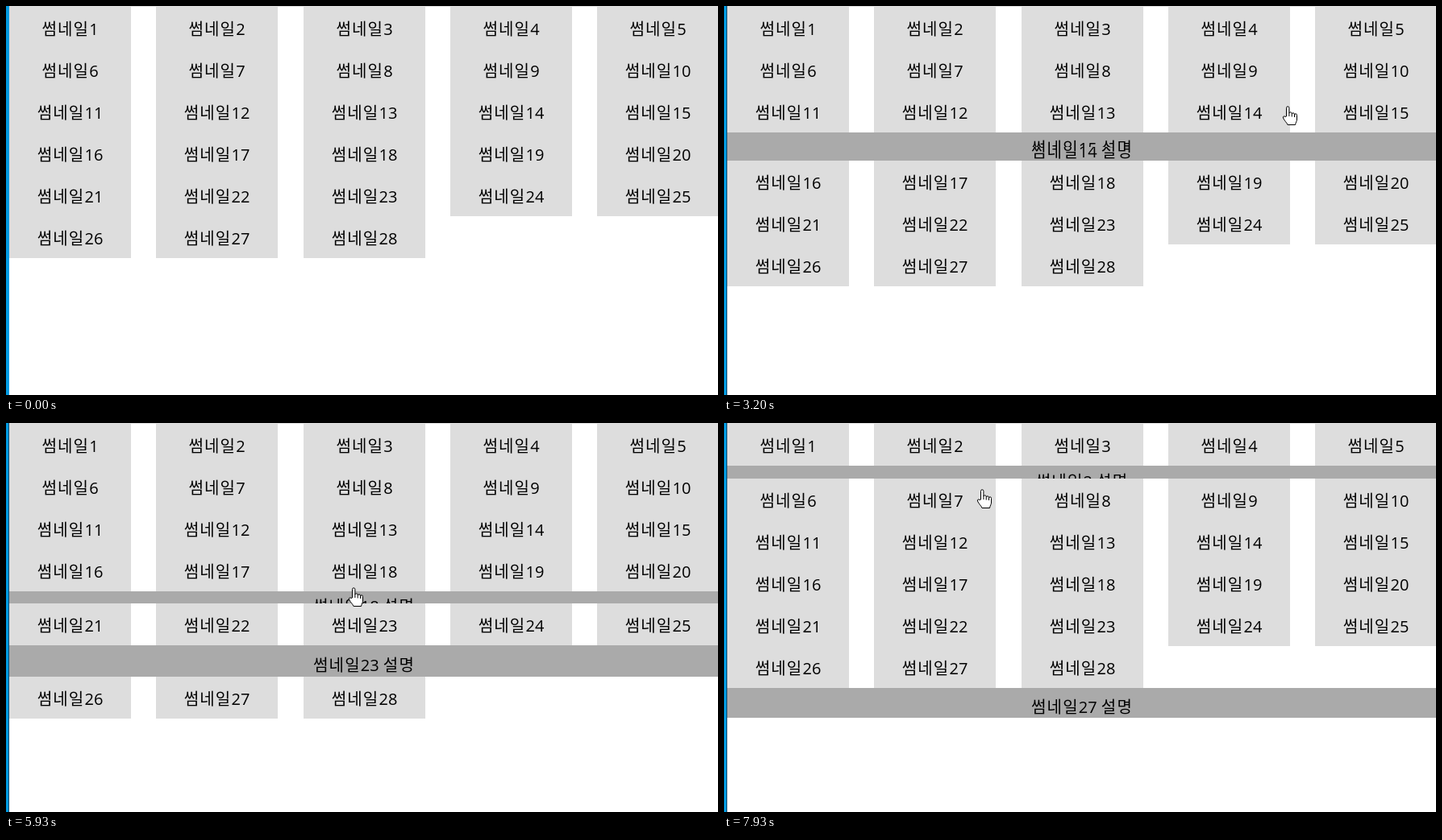
Recreate the animation shown at these times as an HTML page with a canvas. Size 883 px wide and 483 px high, loop 8 s.

```html
<!DOCTYPE html>
<html lang="ko">
<head>
<meta charset="utf-8">
<title>썸네일 아코디언</title>
<style>
html, body { margin: 0; width: 100%; height: 100%; overflow: hidden; background: #fff; }
canvas { display: block; }
</style>
</head>
<body>
<canvas id="stage" width="883" height="483"></canvas>
<script>
const ctx = document.getElementById('stage').getContext('2d');
const LOOP = 8000, SLIDE = 800, REST = 150;
const COUNT = 28, COLS = 5, ROW_H = 52, PANEL_H = 52.4;
const HANGUL = { font: '300 20px "Noto Sans CJK KR", "Noto Sans CJK", sans-serif', spacing: '1.2px' };
const LATIN = { font: '20px "Open Sans", "Noto Sans", sans-serif', spacing: '0px' };

// Pointer stops; those with an id click that thumbnail
const stops = [
  { t: 500, x: 440, y: 500 },
  { t: 1130, x: 444, y: 140, id: 13 },
  { t: 2150, x: 610, y: 129, id: 14 },
  { t: 2883, x: 802, y: 122, id: 15 },
  { t: 3762, x: 271, y: 134, id: 12 },
  { t: 4280, x: 274, y: 203 },
  { t: 4805, x: 460, y: 282, id: 23 },
  { t: 5070, x: 460, y: 282 },
  { t: 5650, x: 446, y: 192, id: 18 },
  { t: 6655, x: 260, y: 342, id: 27 },
  { t: 7635, x: 263, y: 37, id: 2 },
  { t: 8200, x: 361, y: 114 }
];
const clicks = stops.filter(stop => stop.id);

const arrow = new Path2D('M-.5.5V16.5L3 13L5.5 18.5L8 17.5L5.7 12H10.5Z');
const hand = new Path2D('M-1.5 13V2.5a1.7 1.7 0 0 1 3.4 0V9a1.7 1.7 0 0 1 3.3.2V10a1.7 1.7 0 0 1 3.3.4v.8' +
  'a1.5 1.5 0 0 1 3 .3V17c0 2-1.5 3.5-2 6.5H0c-.8-2.5-4-5-5.5-8.5-.8-2 1.4-2.8 2.5-1.5z' +
  'M1.9 9v4M5.2 10v3.5M8.5 11v3');

const swing = x => (1 - Math.cos(Math.PI * Math.min(1, Math.max(0, x)))) / 2;
const colX = c => Math.round(4 + 182.25 * c);

function rect(color, x, y, w, h) {
  ctx.fillStyle = color;
  ctx.fillRect(x, y, w, h);
}

function useFace({ font, spacing }) {
  ctx.font = font;
  ctx.letterSpacing = spacing;
}

// Centred text; digits and spaces use the Latin face
function label(text, cx, baseline) {
  const runs = text.split(/([\d ]+)/).filter(Boolean).map(s => {
    const face = /[\d ]/.test(s) ? LATIN : HANGUL;
    useFace(face);
    return { s, face, w: ctx.measureText(s).width };
  });
  let x = cx - runs.reduce((sum, run) => sum + run.w, 0) / 2;
  ctx.fillStyle = '#000';
  for (const { s, face, w } of runs) {
    useFace(face);
    ctx.fillText(s, x, baseline);
    x += w;
  }
}

// Each click opens its panel and closes the one before
function openPanels(t) {
  return clicks.map(({ t: start, id }, i) => {
    const end = clicks[i + 1]?.t ?? Infinity;
    const p = swing((t - start) / SLIDE) * (1 - swing((t - end) / SLIDE));
    return { id, p, row: Math.floor((id - 1) / COLS), h: p === 1 ? ROW_H : Math.ceil(PANEL_H * p) };
  }).filter(panel => panel.h > 0).sort((a, b) => a.id - b.id);
}

function drawPanel({ id, p, h }, y) {
  ctx.save();
  ctx.beginPath();
  ctx.rect(4, y, 879, h);
  ctx.clip();
  rect('#aaa', 4, y, 879, h);
  label(`썸네일${id} 설명`, 444, Math.round(y + 23 + 12 * p));
  ctx.restore();
}

// The pointer rests around each stop and glides in between
function pointerAt(t) {
  const i = stops.findIndex(stop => stop.t > t);
  if (i < 1) return null;
  const a = stops[i - 1], b = stops[i];
  const e = swing((t - a.t - REST) / (b.t - a.t - 2 * REST || 1));
  return { x: Math.round(a.x + (b.x - a.x) * e), y: Math.round(a.y + (b.y - a.y) * e) };
}

function drawPointer({ x, y }, shape) {
  ctx.save();
  ctx.translate(x, y);
  ctx.fillStyle = '#fff';
  ctx.strokeStyle = '#000';
  ctx.lineWidth = 1;
  ctx.lineJoin = 'round';
  ctx.fill(shape);
  ctx.stroke(shape);
  ctx.restore();
}

function draw(t) {
  rect('#fff', 0, 0, 883, 483);
  rect('#ddd', 4, 0, 879, 1);
  rect('#009be1', 0, 0, 4, 483);
  if (t >= clicks[0].t) rect('#00486c', 3, 0, 1, 483);

  const panels = openPanels(t), pointer = pointerAt(t);
  let y = 1, overCell = false;
  for (let row = 0; row * COLS < COUNT; row++) {
    for (let col = 0; col < COLS; col++) {
      const id = row * COLS + col + 1, x = colX(col);
      if (id > COUNT) break;
      rect('#ddd', x, y, 151, ROW_H);
      label(`썸네일${id}`, x + 75.5, y + 35);
      if (pointer && pointer.x >= x && pointer.x < x + 149 &&
          pointer.y >= y && pointer.y < y + ROW_H) overCell = true;
    }
    y += ROW_H;
    const below = panels.filter(panel => panel.row === row);
    below.forEach(panel => drawPanel(panel, y));
    y += Math.max(0, ...below.map(panel => panel.h));
  }
  if (pointer) drawPointer(pointer, overCell ? hand : arrow);
}

const begin = performance.now();
function tick() {
  draw((performance.now() - begin) % LOOP);
  requestAnimationFrame(tick);
}
tick();
</script>
</body>
</html>
```
